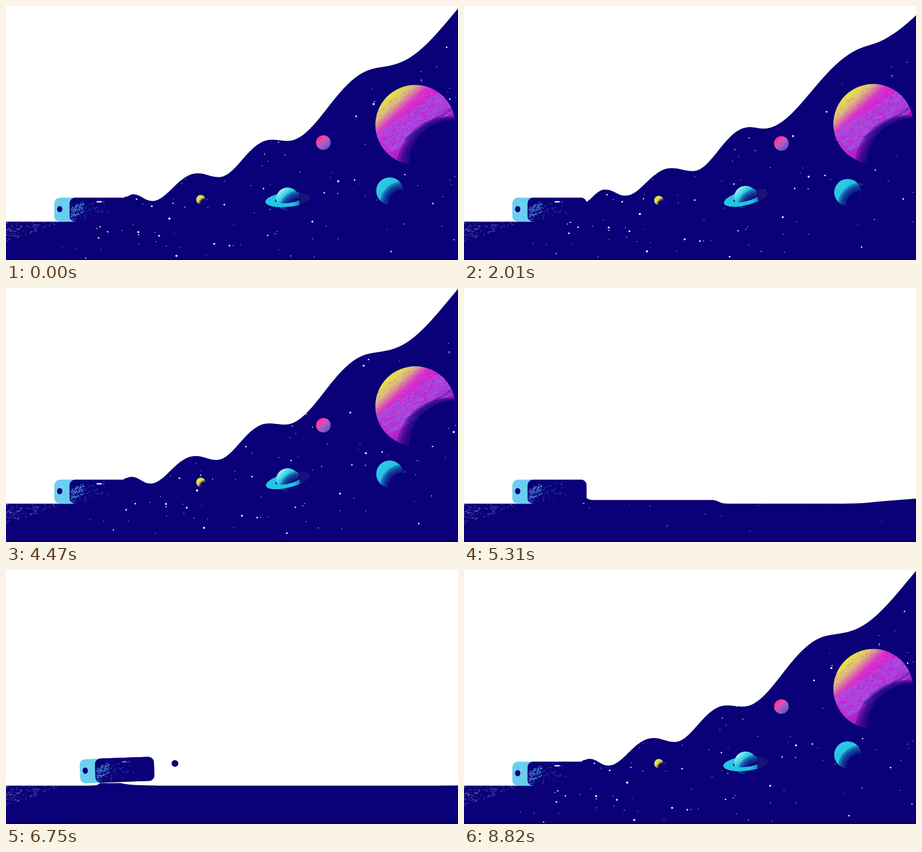
Write an HTML page with a canvas that moves like this. It is 804 px wide and 452 px high and loops after 8850 ms.

```html
<!DOCTYPE html>
<html>
<head>
<meta charset="utf-8">
<style>
html, body { margin: 0; width: 100%; height: 100%; overflow: hidden; background: #fff; }
canvas { display: block; width: 804px; height: 452px; }
</style>
</head>
<body>
<canvas id="stage" width="804" height="452"></canvas>
<script>
const ctx = document.getElementById('stage').getContext('2d');
const W = 804, H = 452, LOOP = 8850, GROUND = 383.7, TAU = Math.PI * 2;
const NAVY = '#0a0078', SKY = '#6acdf0';

const clamp = v => Math.max(0, Math.min(1, v));
const smooth = v => { v = clamp(v); return v * v * (3 - 2 * v); };
const ramp = (t, a, b) => smooth((t - a) / (b - a));
const mix = (a, b, k) => a + (b - a) * k;
const bump = (t, a, b) => Math.sin(Math.PI * clamp((t - a) / (b - a)));

function seeded(s) {
  return () => {
    s = (s + 0x6D2B79F5) | 0;
    let r = Math.imul(s ^ (s >>> 15), 1 | s);
    r = (r + Math.imul(r ^ (r >>> 7), 61 | r)) ^ r;
    return ((r ^ (r >>> 14)) >>> 0) / 4294967296;
  };
}

function disc(x, y, rx, ry = rx, rot = 0) {
  ctx.beginPath();
  ctx.ellipse(x, y, rx, ry, rot, 0, TAU);
}

// Crest and trough tracks, one knot per half wave from q = -1 to q = 5
const crest = {
  x: [208, 205, 223, 280, 337, 398, 467, 547, 645, 765, 880, 1010, 1140],
  y: [341, 345, 336, 317, 299, 277, 241, 189, 117, 32, -75, -170, -270], bend: 0.55
};
const trough = {
  x: [214, 215, 257, 316, 375, 437, 497, 571, 690, 800, 930, 1060, 1190],
  y: [338, 357, 348, 327, 306, 281, 243, 191, 108, 14, -90, -190, -290], bend: 0.8
};

function spline(k, q) {
  const f = (q + 1) * 2, last = k.length - 1;
  const i = Math.max(0, Math.min(last - 1, Math.floor(f))), u = f - i;
  const b = k[i], c = k[i + 1];
  const a = i ? k[i - 1] : 2 * b - c, d = i < last - 1 ? k[i + 2] : 2 * c - b;
  return b + u * (c - a + u * (2 * a - 5 * b + 4 * c - d + u * (3 * (b - c) + d - a))) / 2;
}

function rise(t, x) {
  const far = clamp((x - 218) / 586);
  if (t < 4500) return 1;
  if (t < 6400) return 1 - smooth((t - 4500 - far * 240) / 540);
  return smooth((t - 7230 - far * 330) / 620);
}

function knot(track, q, t, shift) {
  const x = spline(track.x, q), g = rise(t, x);
  return {
    x: x + shift * clamp(1 - (x - 200) / 200),
    y: mix(GROUND, spline(track.y, q), g),
    m: -Math.min(0.78, Math.max(0, q - 2.6) * track.bend) * g
  };
}

function spacePath(t, shift) {
  const p = (((t < 6000 ? t + 30 : t - 8820) / 900) % 1 + 1) % 1;
  const pts = [];
  for (let n = -1; n <= 4; n++) {
    pts.push(knot(crest, n + p, t, shift), knot(trough, n + p, t, shift));
  }
  ctx.beginPath();
  ctx.moveTo(0, H);
  ctx.lineTo(0, GROUND);
  ctx.lineTo(pts[0].x, GROUND);
  ctx.lineTo(pts[0].x, pts[0].y);
  pts.slice(1).forEach((b, i) => {
    const a = pts[i], d = b.x - a.x, rising = i % 2;
    const h = d * (rising ? 0.33 : 0.4), k = d * (rising ? 0.42 : 0.4);
    ctx.bezierCurveTo(a.x + h, a.y + a.m * h, b.x - k, b.y - b.m * k, b.x, b.y);
  });
  ctx.lineTo(pts[pts.length - 1].x, H);
  ctx.closePath();
}

// Low swells left on the ground while space drains away
function swells(t) {
  const base = GROUND + 1;
  ctx.fillStyle = NAVY;
  const s = 6.5 * ramp(t, 4850, 5200) * (1 - ramp(t, 5330, 5560));
  if (s > 0 && t < 5600) {
    const end = 445 + (t - 5310) * 0.45, y = GROUND - s;
    ctx.beginPath();
    ctx.moveTo(214, base);
    ctx.lineTo(214, y - 9 * s / 6.5);
    ctx.quadraticCurveTo(218, y, 229, y);
    ctx.lineTo(end - 5, y);
    ctx.bezierCurveTo(end + 8, y, end + 8, GROUND, end + 24, GROUND);
    ctx.lineTo(end + 24, base);
    ctx.fill();
  }
  const k = 9 * bump(t, 4900, 5720) + 2 * bump(t, 6600, 6900);
  if (k > 0) {
    const x = t < 6000 ? 680 : 770;
    ctx.beginPath();
    ctx.moveTo(x, base);
    ctx.lineTo(x, GROUND);
    ctx.quadraticCurveTo(x + 30, GROUND, x + 58, GROUND - k * 0.4);
    ctx.lineTo(W, GROUND - k);
    ctx.lineTo(W, base);
    ctx.fill();
  }
}

const rs = seeded(41);
const stars = Array.from({ length: 225 }, () => ({
  x: 100 + rs() * 750, y: Math.pow(rs(), 0.8) * 460, r: 0.5 + 1.35 * Math.pow(rs(), 4) + 0.25 * rs()
}));

function drawStars(t, u) {
  const a = t < 6000
    ? 1 - 0.8 * ramp(t, 4600, 5250) - 0.2 * ramp(t, 5310, 5550)
    : ramp(t, 7350, 8050);
  if (a <= 0) return;
  ctx.globalAlpha = a;
  ctx.fillStyle = '#fff';
  for (const s of stars) {
    disc(s.x + u * 0.011, s.y - u * 0.004, s.r);
    ctx.fill();
  }
  ctx.globalAlpha = 1;
}

// Chalky grain: short dashes in leaning lanes, denser at the left when crowd > 1
function grain(seed, n, w, h, lean, len, thick = 1, crowd = 1) {
  const r = seeded(seed);
  return Array.from({ length: n }, () => {
    const x = Math.pow(r(), crowd) * w, lane = Math.floor(r() * 15) / 15 + r() * 0.05;
    return { x, y: lane * h + lean * x, l: len * (0.2 + r() * r()), w: thick * (0.4 + r() * 0.6) };
  });
}

function drawGrain(list, color, lean, alpha = 1) {
  ctx.globalAlpha = alpha;
  ctx.strokeStyle = color;
  for (const g of list) {
    ctx.lineWidth = g.w;
    ctx.beginPath();
    ctx.moveTo(g.x, g.y);
    ctx.lineTo(g.x + g.l, g.y + g.l * lean);
    ctx.stroke();
  }
  ctx.globalAlpha = 1;
}

const groundGrain = grain(7, 230, 107, 36, -0.34, 4, 1, 1.3);
const streakGrain = grain(12, 120, 66, 38, -0.45, 6, 0.9, 1.8);
const patchGrain = grain(15, 130, 22, 20, -0.45, 4, 1.2);
const coverGrain = grain(23, 50, 27, 24, -0.4, 3);
const bandGrain = grain(31, 750, 2, 0.62, 0, 0.17, 0.024);
const edgeGrain = grain(5, 200, 2, 0.6, 0, 0.1, 0.02);
const pinkGrain = grain(18, 70, 1.6, 0.9, 0, 0.2, 0.08);

// Stacked shadow discs, sliding from an outer to an inner centre
function shade(from, to, steps, cx = 0.95, cy = 0.97) {
  ctx.fillStyle = NAVY;
  for (let i = 0; i < steps; i++) {
    const k = i / (steps - 1);
    ctx.globalAlpha = k === 1 ? 1 : 0.34;
    disc(mix(cx, 0.95, k), mix(cy, 0.97, k), mix(from, to, k));
    ctx.fill();
  }
  ctx.globalAlpha = 1;
}

function ball(stops) {
  const g = ctx.createLinearGradient(-0.7, -0.7, 0.5, 0.6);
  stops.forEach((c, i) => g.addColorStop(i / (stops.length - 1), c));
  disc(0, 0, 1);
  ctx.fillStyle = g;
  ctx.fill();
  ctx.clip();
}

function giant() {
  ball(['#e8e542', '#dcb97c', '#d630cc', '#cb20d0', '#bd2bd6', '#b01ccc', '#a014bc', '#8d12b0']);
  ctx.save();
  ctx.rotate(-0.58);
  ctx.translate(-1, -0.36);
  drawGrain(bandGrain, '#9a5ae2', 0, 0.85);
  ctx.fillStyle = 'rgba(98,20,165,.5)';
  ctx.fillRect(0.6, 0.49, 1.4, 0.07);
  ctx.translate(0, -0.48);
  drawGrain(edgeGrain, '#dc52c8', 0, 0.6);
  ctx.restore();
  shade(1.32, 1.1, 5, 0.85, 1.1);
}

function pink() {
  ball(['#f22f92', '#e94ba8', '#a85bc6', '#6b55c0']);
  ctx.rotate(-0.6);
  ctx.translate(-0.7, 0);
  drawGrain(pinkGrain, '#7d69d8', 0, 0.7);
}

function yellow() {
  ball(['#e9e842', '#dfd747', '#bfae5b']);
  shade(1.45, 1.05, 4);
}

function blue() {
  ball(['#2dcbe6', '#26c2e1', '#1aa2d0']);
  shade(1.68, 1.08, 5);
}

function ring(tilt, front) {
  ctx.save();
  ctx.rotate(tilt);
  if (front) {
    ctx.beginPath();
    ctx.rect(-3, 0, 6, 3);
    ctx.clip();
  }
  const g = ctx.createLinearGradient(-1.95, 0, 1.95, 0);
  g.addColorStop(0, '#27c5e6');
  g.addColorStop(0.6, '#24c0e2');
  g.addColorStop(0.74, '#168cc0');
  g.addColorStop(0.76, '#191278');
  g.addColorStop(1, '#191278');
  ctx.beginPath();
  ctx.ellipse(0, 0.06, 1.95, 0.62, 0, 0, TAU);
  ctx.ellipse(0, 0.06, 1.12, 0.29, 0, 0, TAU);
  ctx.fillStyle = g;
  ctx.fill('evenodd');
  ctx.restore();
}

function saturn(u) {
  const tilt = mix(-0.1, -0.24, ramp(u, 0, 1500));
  ring(tilt, false);
  ctx.save();
  ball(['#a6f3ee', '#2fcbe4', '#1fa9d2', '#1579b0']);
  shade(1.7, 1.0, 5);
  ctx.restore();
  ring(tilt, true);
}

const planets = [
  { x: 728, y: 211.5, r: 71, bob: -7, draw: giant },
  { x: 564.5, y: 243, r: 13, bob: 6.5, draw: pink },
  { x: 682.5, y: 329, r: 24, bob: 11, draw: blue },
  { x: 501, y: 343.5, r: 20.5, bob: -13, draw: saturn },
  { x: 346.5, y: 344.5, r: 8.2, bob: 6.5, draw: yellow }
];

function drawPlanets(t, u) {
  const sway = (1 - Math.cos(TAU * u / 2400)) / 2;
  for (const p of planets) {
    const far = (p.x - 218) / 586, out = t < 6000;
    const k = out ? 1 - ramp(t, 4480 + far * 160, 4900 + far * 160)
                  : ramp(t, 7400 + far * 150, 8050 + far * 300);
    if (k < 0.01) continue;
    ctx.save();
    ctx.translate(out ? p.x : mix(215, p.x, k), mix(out ? 430 : 362, p.y + p.bob * sway, k));
    ctx.scale(p.r * k, p.r * k);
    p.draw(u);
    ctx.restore();
  }
}

function phonePose(t) {
  let dx = 0, dy = 0, rot = 0;
  if (t > 5520 && t < 7950) {
    const v = clamp((t - 5520) / 1120);
    dx = 45.5 * smooth(v);
    dy = -1560 * v * (1 - v) - 6.5 * bump(t, 6640, 6860);
    rot = -TAU * smooth(v) - 0.038 * bump(t, 6640, 6860);
    if (t > 7250) dx = mix(mix(45.5, -52, ramp(t, 7250, 7480)), 0, ramp(t, 7480, 7950));
  }
  return { dx, dy, rot };
}

function drawPhone(t, pose) {
  ctx.save();
  ctx.translate(152 + pose.dx, 362.5 + pose.dy);
  ctx.rotate(pose.rot);
  ctx.translate(-66, -21.5);

  ctx.fillStyle = NAVY;
  ctx.beginPath();
  ctx.roundRect(27, 0, 105, 43, 10);
  ctx.fill();
  ctx.fillStyle = SKY;
  ctx.beginPath();
  ctx.roundRect(0, 0, 40, 43, [10, 0, 0, 10]);
  ctx.fill();

  ctx.save();
  ctx.clip();
  ctx.translate(0, 4);
  drawGrain(coverGrain, '#c5f1ff', -0.4, 0.5);
  ctx.restore();

  ctx.save();
  ctx.fillStyle = NAVY;
  ctx.beginPath();
  ctx.roundRect(27, 0, 105, 43, 10);
  ctx.fill();
  ctx.clip();
  ctx.translate(28, 20);
  drawGrain(streakGrain, '#4f8fe0', -0.45, 0.75);
  ctx.translate(1, -3);
  drawGrain(patchGrain, '#5cb8f0', -0.45, 0.85);
  ctx.restore();

  disc(9.5, 20.5, 4.7, 5.6);
  ctx.fillStyle = NAVY;
  ctx.fill();
  ctx.globalAlpha = t < 6000 ? 1 - ramp(t, 4850, 5250) : ramp(t, 6600, 6950);
  ctx.fillStyle = '#fff';
  ctx.beginPath();
  ctx.roundRect(75, 6.2, 9.5, 2.3, 1);
  ctx.fill();
  ctx.restore();
}

function splash(t) {
  if (t < 6600 || t > 6930) return;
  const k = 4.5 * bump(t, 6620, 6880);
  ctx.fillStyle = NAVY;
  ctx.beginPath();
  ctx.moveTo(150, GROUND);
  ctx.quadraticCurveTo(164, GROUND, 167, GROUND - k);
  ctx.lineTo(205, GROUND - k);
  ctx.quadraticCurveTo(212, GROUND - 1, 268, GROUND);
  ctx.lineTo(268, GROUND + 1);
  ctx.lineTo(150, GROUND + 1);
  ctx.fill();
  const v = (t - 6600) / 300;
  disc(262 + 77 * v, 391 - 185 * v * (1.005 - v), 6);
  ctx.fill();
}

function draw(t) {
  const u = t < 6000 ? t : t - LOOP;
  const pose = phonePose(t);
  ctx.fillStyle = '#fff';
  ctx.fillRect(0, 0, W, H);

  ctx.save();
  spacePath(t, t > 7200 ? pose.dx : 0);
  ctx.fillStyle = NAVY;
  ctx.fill();
  ctx.clip();
  drawStars(t, u);
  drawPlanets(t, u);
  ctx.restore();

  swells(t);
  splash(t);
  ctx.save();
  ctx.beginPath();
  ctx.rect(0, GROUND, 107, 40);
  ctx.clip();
  ctx.translate(0, 384);
  drawGrain(groundGrain, '#c9c4ee', -0.34, 0.65);
  ctx.restore();
  ctx.fillStyle = '#070058';
  ctx.fillRect(0, 450, W, 2);
  drawPhone(t, pose);
}

const start = performance.now();
function frame(now) {
  const t = Math.max(0, now - start) % LOOP;
  draw(Math.floor(t / 30) * 30);
  requestAnimationFrame(frame);
}
draw(0);
requestAnimationFrame(frame);
</script>
</body>
</html>
```
